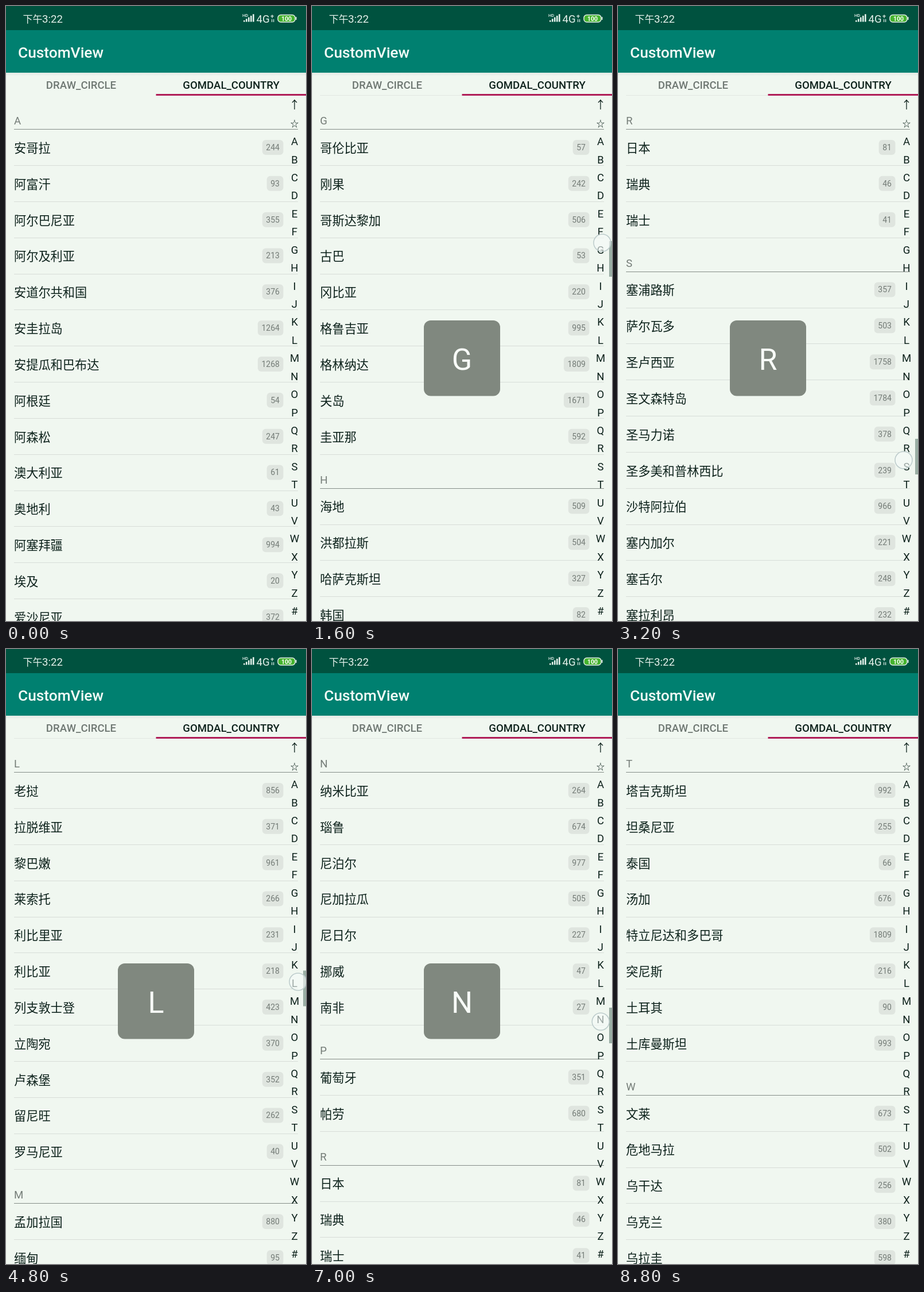
These frames come from a looping animation (523 by 1070 pixels, 9200 ms). An HTML page with a canvas:

```html
<!DOCTYPE html>
<html lang="zh">
<head>
<meta charset="utf-8">
<style>
  html, body { margin: 0; width: 100%; height: 100%; overflow: hidden; background: #f0f7f0; }
  canvas { display: block; }
</style>
</head>
<body>
<canvas id="stage" width="523" height="1070"></canvas>
<script>
const ctx = document.getElementById('stage').getContext('2d');
const LOOP = 9200, STEP = 200;
const LIST_TOP = 155.3, HEADER = 59, ROW = 62.83;
const INDEX_X = 503, INDEX_A = 235.6, PITCH = 31.42;
const BG = '#f0f7f0', INK = '#0c211b', GRAY = '#737b76';
const LETTERS = 'ABCDEFGHIJKLMNOPQRSTUVWXYZ#';

// Country names with their dialling codes, by initial
const countries = {
  A: '安哥拉244 阿富汗93 阿尔巴尼亚355 阿尔及利亚213 安道尔共和国376 安圭拉岛1264 安提瓜和巴布达1268 阿根廷54 阿森松247 澳大利亚61 奥地利43 阿塞拜疆994 埃及20 爱沙尼亚372',
  B: '巴哈马1242 巴林973 巴巴多斯1246 白俄罗斯375 比利时32 伯利兹501 贝宁229 玻利维亚591 博茨瓦纳267 巴西55 保加利亚359 布隆迪257 冰岛354',
  C: '朝鲜850 赤道几内亚240',
  D: '丹麦45 德国49 多哥228 东帝汶670',
  E: '厄瓜多尔593 俄罗斯7 厄立特里亚291',
  F: '斐济679 芬兰358 法国33 菲律宾63 佛得角238 梵蒂冈379',
  G: '哥伦比亚57 刚果242 哥斯达黎加506 古巴53 冈比亚220 格鲁吉亚995 格林纳达1809 关岛1671 圭亚那592',
  H: '海地509 洪都拉斯504 哈萨克斯坦327 韩国82 荷兰31 黑山382',
  J: '柬埔寨855 加拿大1 捷克420 吉布提253 加蓬241 加纳233 几内亚224 津巴布韦263 吉尔吉斯坦331',
  K: '喀麦隆237 库克群岛682 科特迪瓦225 肯尼亚254 科威特965 开曼群岛1345 卡塔尔974',
  L: '老挝856 拉脱维亚371 黎巴嫩961 莱索托266 利比里亚231 利比亚218 列支敦士登423 立陶宛370 卢森堡352 留尼旺262 罗马尼亚40',
  M: '孟加拉国880 缅甸95 马达加斯加261 马拉维265 马来西亚60 马尔代夫960 马里223 马耳他356 毛里求斯230 墨西哥52 摩尔多瓦373 摩纳哥377 蒙古976',
  N: '纳米比亚264 瑙鲁674 尼泊尔977 尼加拉瓜505 尼日尔227 挪威47 南非27',
  P: '葡萄牙351 帕劳680',
  R: '日本81 瑞典46 瑞士41',
  S: '塞浦路斯357 萨尔瓦多503 圣卢西亚1758 圣文森特岛1784 圣马力诺378 圣多美和普林西比239 沙特阿拉伯966 塞内加尔221 塞舌尔248 塞拉利昂232 斯洛伐克421 苏丹249 苏里南597',
  T: '塔吉克斯坦992 坦桑尼亚255 泰国66 汤加676 特立尼达和多巴哥1809 突尼斯216 土耳其90 土库曼斯坦993',
  W: '文莱673 危地马拉502 乌干达256 乌克兰380 乌拉圭598 委内瑞拉58'
};
const sections = Object.keys(countries);

// Finger: time, x, y
const finger = [
  [400, 504, 238], [1400, 506, 412], [1600, 506, 412], [3200, 498, 790], [3400, 500, 815],
  [4800, 509, 579], [6000, 505, 577], [6800, 504, 590], [7600, 501, 823]
];
// Scroll bar: letter index, top
const thumb = [[0, 156], [6, 409], [11, 559.5], [17, 753], [19, 860]];

function along(points, at) {
  if (at <= points[0][0]) return points[0].slice(1);
  for (let i = 1; i < points.length; i++) {
    const a = points[i - 1], b = points[i];
    if (at <= b[0]) {
      const k = (at - a[0]) / (b[0] - a[0]);
      return a.slice(1).map((v, j) => v + (b[j + 1] - v) * k);
    }
  }
  return points[points.length - 1].slice(1);
}

const between = (t, a, b) => t >= a && t < b;

// Text centred vertically on y
function text(s, x, y, size, color, align = 'left', weight = 400) {
  ctx.font = `${weight} ${size}px Roboto, "Noto Sans CJK SC", "Noto Sans CJK", sans-serif`;
  ctx.textAlign = align;
  ctx.fillStyle = color;
  ctx.fillText(s, x, y + size * (/[\u2190-\uffff]/.test(s) ? 0.38 : 0.355));
}

function rect(x, y, w, h, color) {
  ctx.fillStyle = color;
  ctx.fillRect(x, y, w, h);
}

function round(x, y, w, h, r, fill, stroke) {
  ctx.beginPath();
  ctx.roundRect(x, y, w, h, r);
  if (fill) { ctx.fillStyle = fill; ctx.fill(); }
  if (stroke) { ctx.strokeStyle = stroke; ctx.lineWidth = 1.5; ctx.stroke(); }
}

const rule = (y, color) => rect(14, Math.round(y), 495, 1, color);

function drawRow(entry, y) {
  const [, name, code] = entry.match(/(\D+)(\d+)/);
  const mid = y + ROW / 2 + 0.3, w = 13 + code.length * 7.9;
  text(name, 14, mid + 0.9, 21.2, INK);
  round(483.5 - w, mid - 13, w, 26, 6, '#dfe5df');
  text(code, 483.5 - w / 2, mid, 14, GRAY, 'center');
  rule(y + ROW, '#d7ddd8');
}

function drawList(first) {
  let y = LIST_TOP;
  if (first > 0) rule(y, '#e1e7e2');
  for (const key of sections.slice(first)) {
    text(key, 14, y + 44.2, 18.6, GRAY);
    y += HEADER;
    rule(y, '#858d88');
    for (const entry of countries[key].split(' ')) {
      if (y > 1070) return;
      drawRow(entry, y);
      y += ROW;
    }
  }
}

function drawIndex() {
  text('↑', INDEX_X, 172, 19, INK, 'center');
  text('☆', INDEX_X, 204, 14.5, INK, 'center');
  [...LETTERS].forEach((c, i) => text(c, INDEX_X, INDEX_A + i * PITCH, 18.6, INK, 'center'));
}

function drawBars() {
  rect(0, 0, 523, 42, '#00523f');
  rect(0, 42, 523, 74, '#008070');
  const shade = ctx.createLinearGradient(0, 116, 0, 122);
  shade.addColorStop(0, '#e2e9e4');
  shade.addColorStop(1, BG);
  rect(0, 116, 523, 6, shade);

  const pale = '#e4f0ea';
  text('下午', 29.5, 22.5, 17, pale);
  text('3:22', 63, 22, 18.6, pale);
  text('HD', 412, 16, 7.5, pale, 'left', 500);
  for (let i = 0; i < 5; i++) {
    const h = 2.5 + i * 2.7;
    rect(414 + i * 4, 27.5 - h, 2.6, h, pale);
  }
  text('4G', 436.5, 22, 18.6, pale);
  text('+', 461, 18, 11, pale, 'left', 500);
  rect(463, 23, 1.2, 5, pale);
  rect(466, 23, 1.2, 5, pale);
  round(474, 15.5, 30, 12.5, 5, '#45b32e', pale);
  rect(505, 19, 1.5, 5, pale);
  text('100', 489, 21.8, 10.5, '#fff', 'center', 700);

  text('CustomView', 21, 81, 26.3, '#f4fbf7', 'left', 500);
  text('DRAW_CIRCLE', 131, 137, 18.6, '#6e7772', 'center', 500);
  text('GOMDAL_COUNTRY', 392.5, 137, 18.6, INK, 'center', 500);
  rect(261.5, 153, 261.5, 3, '#b01d57');
}

function draw(t) {
  const [x, y] = along(finger, t);
  const touchY = along(finger, t - 60)[1];
  const index = Math.round((touchY - INDEX_A) / PITCH);
  const letter = LETTERS[index];
  const first = sections.filter(s => s <= letter).length - 1;

  rect(0, 0, 523, 1070, BG);
  drawList(first);
  drawBars();
  drawIndex();

  if (between(t, 400, 6400) || between(t, 6800, 8200)) {
    const top = along(thumb, LETTERS.indexOf(sections[first]))[0];
    rect(518, top, 5, 62, '#9bafa5');
  }
  if (between(t, 400, 6000) || between(t, 6800, 7800)) {
    round(195, 547, 133, 131.5, 12, '#80887f');
    text(letter, 261.5, 615, 52, '#f8fcf8', 'center');
  }
  if (between(t, 400, 6200) || between(t, 6800, 8000)) {
    round(x - 15, y - 15, 30, 30, 15, 'rgba(246,250,248,.62)', '#bccbcb');
  }
}

function tick() {
  const t = performance.now() % LOOP;
  draw(Math.floor(t / STEP) * STEP);
  requestAnimationFrame(tick);
}
tick();
</script>
</body>
</html>
```
